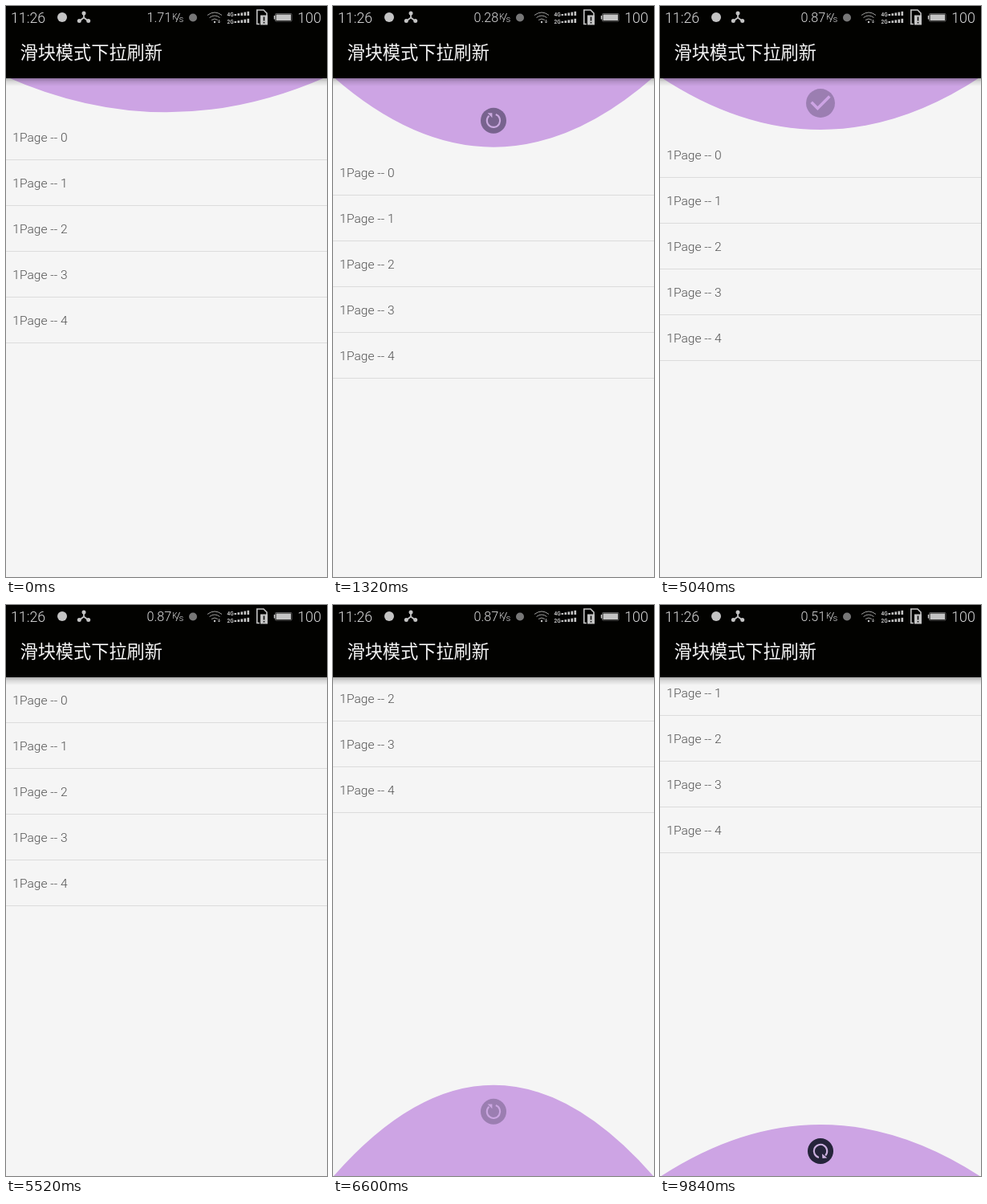
Recreate the animation shown at these times as an HTML page. Size 400x711 px, loop 9960 ms.

```html
<!DOCTYPE html>
<html lang="zh-CN">
<head>
<meta charset="utf-8">
<title>下拉刷新</title>
<style>
  html, body { margin: 0; width: 100%; height: 100%; overflow: hidden; background: #f5f5f5; }
  svg { display: block; width: 100vw; height: 100vh; }
  text { font-family: Roboto, "Noto Sans", sans-serif; font-weight: 300; white-space: pre; }
  .row { font-size: 15.56px; fill: #505050; }
  .title { font: 400 22.2px "Noto Sans CJK SC", "Noto Sans CJK", sans-serif; fill: #f6f6f6; }
  .status { fill: #c4c4c4; }
  .status text { fill: #dcdcdc; }
  .status .tiny { font-size: 6.5px; font-weight: 500; }
  .line { fill: none; stroke: #c4c4c4; }
</style>
</head>
<body>
<svg viewBox="0 0 400 711">
  <defs>
    <linearGradient id="shade" x1="0" y1="0" x2="0" y2="1">
      <stop offset="0" stop-color="#000" stop-opacity=".3"/>
      <stop offset=".4" stop-color="#000" stop-opacity=".12"/>
      <stop offset="1" stop-color="#000" stop-opacity="0"/>
    </linearGradient>
  </defs>
  <rect width="400" height="711" fill="#f5f5f5"/>
  <path id="wave" fill="#cda4e4"/>
  <g id="list"></g>
  <g id="loader">
    <circle r="16" fill="#25243a"/>
    <g id="arrow">
      <path d="M7.7 2.8A8.2 8.2 0 1 1 6 -5.6" fill="none" stroke="#cbb0de" stroke-width="2.1"/>
      <path d="M9.3 -7.4V-1.6H3.5Z" fill="#cbb0de"/>
    </g>
  </g>
  <g id="done">
    <circle r="10" fill="#25243a"/>
    <path fill="#cda4e4" d="M-2 5l-5-5 1.41-1.41L-2 2.17l7.59-7.59L7-4z"/>
  </g>
  <rect y="90" width="400" height="10" fill="url(#shade)"/>
  <rect width="400" height="90" fill="#020200"/>
  <text class="title" x="17.5" y="66.2">滑块模式下拉刷新</text>

  <g class="status">
    <text x="6" y="21" font-size="17.8">11:26</text>
    <circle cx="70" cy="14" r="6"/>
    <path class="line" stroke-width="1.8" d="M97 9V14.5L91 19M97 14.5L103 19"/>
    <circle cx="97" cy="9" r="2.5"/>
    <circle cx="91.3" cy="18.6" r="2.5"/>
    <circle cx="102.7" cy="18.6" r="2.5"/>
    <text id="speed" x="175.5" y="20" font-size="16.2"></text>
    <text x="207" y="17" font-size="10.5">K</text>
    <path class="line" d="M212 20L216.5 9"/>
    <text x="215.5" y="20" font-size="11.5">s</text>
    <circle cx="233" cy="14.5" r="5" fill="#777"/>
    <path class="line" stroke-width=".8" d="M251 11.5Q260 4.5 269 11.5M253.5 14.5Q260 9.5 266.5 14.5M256 17.5Q260 14.5 264 17.5"/>
    <circle cx="260" cy="20" r="1.2"/>
    <path class="line" stroke-width=".8" d="M265.5 17v4M264 19.5l1.5 1.5 1.5-1.5"/>
    <text class="tiny" x="275.5" y="12.5">4G</text>
    <text class="tiny" x="275.5" y="21.5">2G</text>
    <g id="bars"></g>
    <path class="line" stroke-width="1.6" d="M316 22.5H312.8V5H321L325 9V12"/>
    <path d="M317 11.5h9v12h-9z"/>
    <path stroke="#000" stroke-width="1.5" d="M321.5 13.5v5M321.5 20v1.5"/>
    <rect x="335.5" y="9.5" width="20.5" height="9.5" rx="1" fill="none" stroke="#777" stroke-width=".8"/>
    <path d="M336.5 10.5h18.5v7.5h-18.5zM333.8 12h1.5v4.5h-1.5z"/>
    <text x="363.2" y="21" font-size="17.8">100</text>
  </g>
</svg>
<script>
const $ = id => document.getElementById(id);
const set = (el, attrs) => { for (const k in attrs) el.setAttribute(k, attrs[k]); return el; };
const add = (parent, tag, attrs) =>
  parent.appendChild(set(document.createElementNS("http://www.w3.org/2000/svg", tag), attrs));
const clamp = v => Math.max(0, Math.min(1, v));

const LOOP = 9960, STEP = 120, TOP = 90, ROW = 57;
// The wave starts slightly beyond the visible edges
const WAVE_TOP = 88, WAVE_BOTTOM = 712;

for (let i = 0; i < 5; i++) {
  const y = TOP + i * ROW;
  add($("list"), "text", { class: "row", x: 8.3, y: y + 34.1 }).textContent = "1Page -- " + i;
  add($("list"), "rect", { y: y + ROW - 1, width: 400, height: 1, fill: "#dcdcdc" });
  for (const base of [12, 21])
    add($("bars"), "rect", { x: 284.5 + i * 4, y: base - 2 - i * 0.8, width: 2.6, height: 2 + i * 0.8 });
}

// [time, list offset]; positive pulls down, negative pulls up
const pullKeys = [
  [0, 45], [720, 60], [840, 78], [960, 94], [1080, 106], [1200, 111],
  [1320, 89], [1440, 76], [1560, 69], [1680, 67], [5040, 67], [5160, 48],
  [5280, 22], [5400, 5], [5520, 0], [5640, -18], [5760, -36], [6000, -38],
  [6240, -80], [6360, -118], [6480, -137], [6600, -116], [6720, -92],
  [6840, -76], [6960, -69], [7080, -66], [LOOP, -66]
];
const loads = [
  { from: 1200, to: 4440, peak: 111, rest: 67, spin: 1573 },
  { from: 6480, to: LOOP, peak: 137, rest: 66, spin: 6853 }
];
const speeds = [[7560, "0.51"], [4320, "0.87"], [1080, "0.28"], [0, "1.71"]];

function pullAt(t) {
  const i = pullKeys.findIndex(k => k[0] > t);
  const [t0, a] = pullKeys[i - 1], [t1, b] = pullKeys[i];
  return a + (b - a) * (t - t0) / (t1 - t0);
}

// The picture advances in steps, with three longer holds
function stepTime(ms) {
  const t = Math.floor((ms % LOOP) / STEP) * STEP;
  if (t < 720) return 0;
  return t === 5880 || t === 6120 ? t - STEP : t;
}

function draw(ms) {
  const t = stepTime(ms), pull = pullAt(t);
  const base = pull < 0 ? WAVE_BOTTOM : WAVE_TOP;
  const height = pull * 0.985;
  const iconY = base + height - 33 * Math.sign(pull);

  set($("wave"), { d: `M0 ${base}Q200 ${base + 2 * height} 400 ${base}Z` });
  set($("list"), { transform: `translate(0 ${pull})` });

  const load = loads.find(l => t >= l.from && t < l.to);
  set($("loader"), {
    opacity: load ? clamp((load.peak - Math.abs(pull)) / (load.peak - load.rest)) : 0,
    transform: `translate(200 ${iconY})`
  });
  const angle = load ? Math.max(0, t - load.spin) * 0.42 - 90 : 0;
  set($("arrow"), { transform: `rotate(${angle})` });

  const fade = clamp((t - 4800) / 340);
  set($("done"), {
    opacity: t >= 4440 && t < 5520 ? 1 - fade : 0,
    transform: `translate(200 ${iconY}) scale(${1.6 + 0.28 * fade})`
  });

  $("speed").textContent = speeds.find(s => t >= s[0])[1];
}

const start = performance.now();
function tick() {
  draw(performance.now() - start);
  requestAnimationFrame(tick);
}
tick();
</script>
</body>
</html>
```
